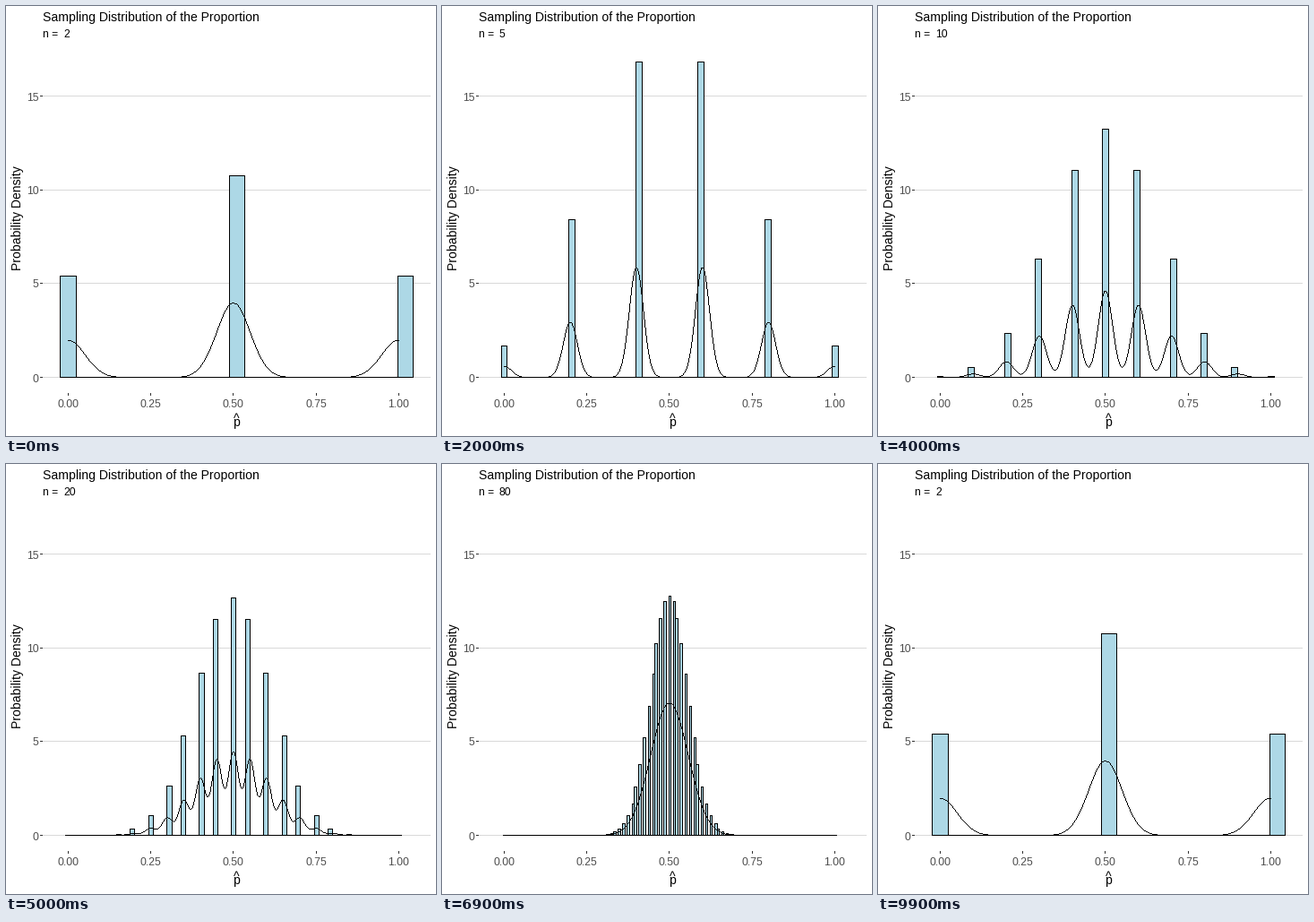
Animation of 480x480 px, one loop 10 s. Source, as a matplotlib script:

```python
import math

import matplotlib.pyplot as plt
import numpy as np
from matplotlib.animation import FuncAnimation
from matplotlib.collections import LineCollection, PolyCollection

SIZE = 480
FRAMES, INTERVAL = 100, 100
DRAWS = 10000                      # sample count behind the bin widths
X0, X_SCALE = 69.0, 368.85         # pixel of proportion 0, pixels per unit
Y0, Y_SCALE = 414.2, 20.95         # pixel of density 0, pixels per unit

# Sample size -> interquartile range in successes
SPREAD = {2: 1, 3: 1, 5: 1, 8: 2, 10: 2, 20: 3, 40: 4, 80: 6, 100: 6, 200: 10}
SIZES = list(SPREAD)
# Frame at which each state starts to change into the next
STARTS = [round(6 + 9.89 * i) for i in range(len(SIZES))]
STEPS = 5

plt.rcParams["font.family"] = "Liberation Sans"


def to_x(v):
    return X0 + np.asarray(v) * X_SCALE


def to_y(v):
    return Y0 - np.asarray(v) * Y_SCALE


def snap(v):
    """Nearest whole pixel."""
    return np.floor(np.asarray(v) + 0.5)


def px(v):
    return snap(to_x(v)) + 0.5


def py(v):
    return snap(to_y(v)) + 0.5


# One column of pixels per point of the density curve
COLUMNS = np.arange(snap(to_x(0)), snap(to_x(1)) + 1)
GRID = (COLUMNS - X0) / X_SCALE


def make_state(n):
    """Bars (left, right, height) and density curve for sample size n."""
    iqr = SPREAD[n] / n
    width = 2 * iqr / DRAWS ** (1 / 3)
    bw = 0.9 * min(0.5 / math.sqrt(n), iqr / 1.34) * DRAWS ** -0.2
    centers = np.arange(round(1 / width) + 1) * width
    heights = np.zeros(len(centers))
    curve = np.zeros(len(GRID))
    for k in range(n + 1):
        prob = math.comb(n, k) / 2 ** n
        heights[round(k / n / width)] += prob / width
        kernel = np.exp(-0.5 * ((GRID - k / n) / bw) ** 2)
        curve += prob * kernel / (bw * math.sqrt(2 * math.pi))
    bars = np.column_stack([centers - width / 2, centers + width / 2, heights])
    return bars, curve


STATES = [make_state(n) for n in SIZES]


def scene(frame):
    """Sample size label, bars and curve shown at a frame."""
    i = sum(frame >= s for s in STARTS) - 1
    if i < 0:
        return (SIZES[0], *STATES[0])
    j = (i + 1) % len(STATES)
    p = (frame - STARTS[i] + 1) / STEPS
    if p >= 1:
        return (SIZES[j], *STATES[j])
    (bars_a, curve_a), (bars_b, curve_b) = STATES[i], STATES[j]
    m = min(len(bars_a), len(bars_b))
    bars = bars_a[:m] * (1 - p) + bars_b[:m] * p
    curve = curve_a * (1 - p) + curve_b * p
    return SIZES[i if p < 0.5 else j], bars, curve


def boxes(left, right, top, bottom):
    """Rectangles as an array of four corners each."""
    corners = [(left, bottom), (left, top), (right, top), (right, bottom)]
    return np.stack([np.column_stack(c) for c in corners], axis=1)


def curve_boxes(curve):
    """One vertical run of pixels per column, joined to its neighbours."""
    y = to_y(curve)
    mid = (y[1:] + y[:-1]) / 2
    before, after = np.append(y[0], mid), np.append(mid, y[-1])
    top = snap(np.minimum(np.minimum(before, after), y))
    bottom = snap(np.maximum(np.maximum(before, after), y))
    return boxes(COLUMNS, COLUMNS + 1, top, np.maximum(bottom, top + 1))


fig = plt.figure(figsize=(SIZE / 72, SIZE / 72), dpi=72, facecolor="white")
ax = fig.add_axes([0, 0, 1, 1])
ax.set_xlim(0, SIZE)
ax.set_ylim(SIZE, 0)
ax.axis("off")


def label(x, y, s, size, color="black", ha="left", **kw):
    return ax.text(x, y, s, fontsize=size, color=color, ha=ha,
                   va="baseline", **kw)


def lines(segments, color):
    ax.add_collection(LineCollection(segments, colors=color, linewidths=1,
                                     antialiaseds=False, snap=False, zorder=1))


def polygons(face, edge, width, z):
    shapes = PolyCollection([], facecolors=face, edgecolors=edge,
                            linewidths=width, antialiaseds=False, snap=False,
                            joinstyle="miter", zorder=z)
    ax.add_collection(shapes, autolim=False)
    return shapes


GREY_TEXT, TICK, GRIDLINE = "#4D4D4D", "#333333", "#D9D9D9"

y_ticks, x_ticks = [0, 5, 10, 15], [0, 0.25, 0.5, 0.75, 1]
lines([[(41, py(v)), (474, py(v))] for v in y_ticks], GRIDLINE)
lines([[(38, py(v)), (41, py(v))] for v in y_ticks], TICK)
lines([[(px(v), 432), (px(v), 435)] for v in x_ticks], TICK)
for v in y_ticks:
    label(36.5, py(v) + 5, str(v), 12.2, GREY_TEXT, "right")
for v in x_ticks:
    label(px(v), 448, f"{v:.2f}", 12.2, GREY_TEXT, "center")

label(41, 17, "Sampling Distribution of the Proportion", 14)
label(41, 35, "n =", 12)
count = label(64, 35, "", 12.2)
label(257, 469, "p", 14, ha="center")
label(257, 465, "^", 14, ha="center")
label(17.5, 237, "Probability Density", 14, ha="center", rotation=90,
      rotation_mode="anchor")

hist = polygons("#ADD8E6", "black", 1, 2)
density = polygons("black", "none", 0, 3)


def draw(frame):
    n, bars, curve = scene(frame)
    count.set_text(str(n))
    left, right, top = px(bars[:, 0]), px(bars[:, 1]), py(bars[:, 2])
    hist.set_verts(boxes(left, right, top, np.full(len(bars), py(0))))
    density.set_verts(curve_boxes(curve))
    return hist, density, count


anim = FuncAnimation(fig, draw, frames=FRAMES, interval=INTERVAL,
                     repeat=True, repeat_delay=0, blit=False)
plt.show()
```
